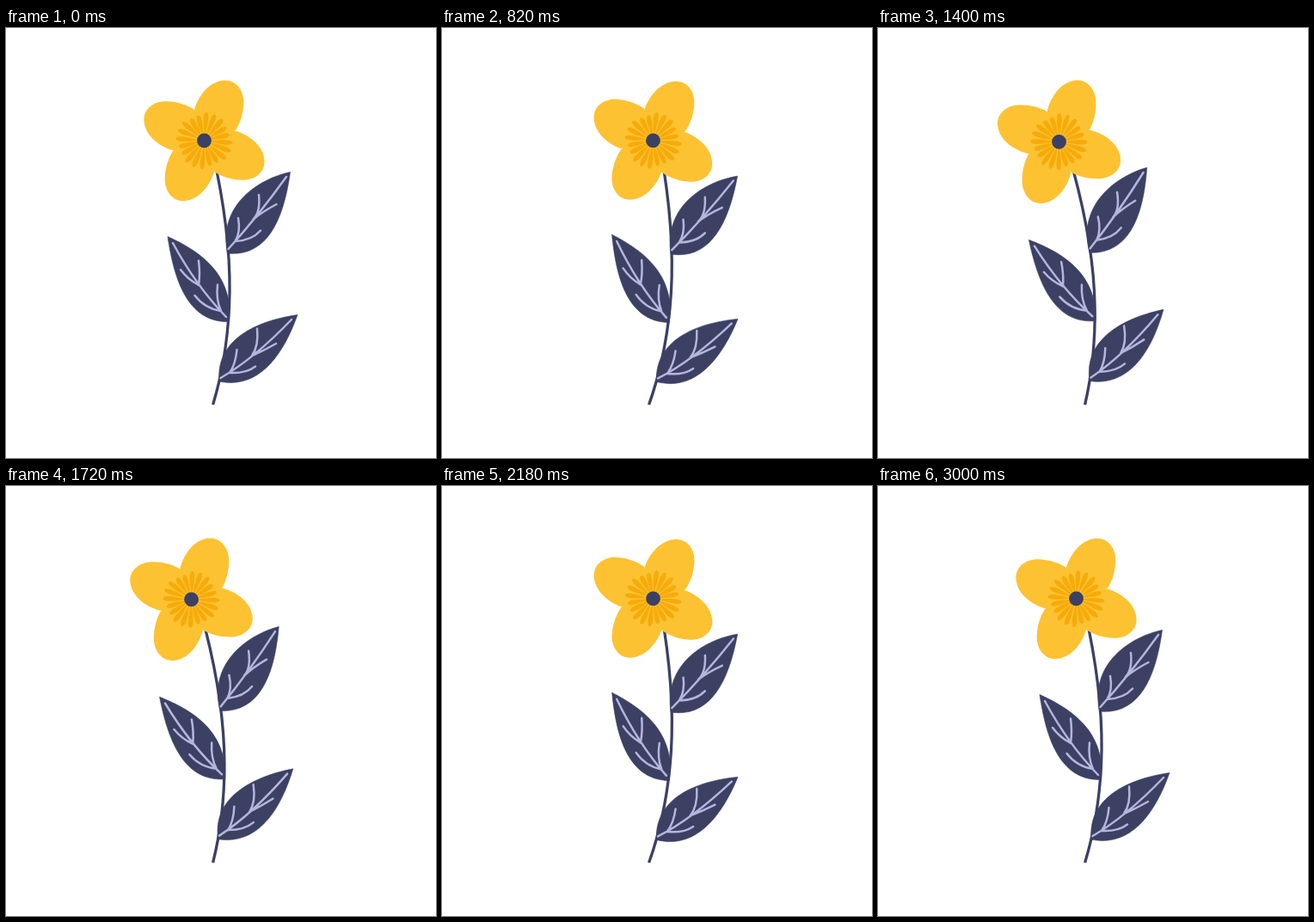
Recreate the animation shown at these times as an HTML page. Size 500 px wide and 500 px high, loop 3020 ms.

```html
<!DOCTYPE html>
<html lang="en">
<head>
<meta charset="utf-8">
<title>Swaying flower</title>
<style>
  html, body { margin: 0; width: 100%; height: 100%; overflow: hidden; background: #fff; }
  svg { display: block; width: 100%; height: 100%; }
</style>
</head>
<body>
<svg viewBox="0 0 500 500">
  <defs>
    <path id="petal" d="M0,0 L-11.5,-36 C-7,-52 6,-69 23,-70 C38,-71 46.3,-57 45.8,-44 C45.5,-31 41.5,-20 36.5,-12 Z"/>
    <path id="stamen" d="M0,-6 C-2,-14 -5,-33 0,-33 C5,-33 2,-14 0,-6"/>
  </defs>
  <g id="plant">
    <path fill="none" stroke="#3c4063" stroke-width="3.3"
      d="M245,166 C257,225 262,275 259.5,325 C257.5,365 250,407 240.6,438"/>
    <g fill="#3c4063" stroke="#3c4063" stroke-width="0.6">
      <path d="M330.5,167.5 C295,175 246,205 257.5,262 C300,266 322,230 330.5,167.5"/>
      <path d="M188,242.5 C222,258 265,284 259.5,341.5 C210,343 195,290 188,242.5"/>
      <path d="M339,333.5 C300,339 243,358 248,411 C292,420 321,384 339,333.5"/>
    </g>
    <g fill="none" stroke="#b4b6de" stroke-width="2.5" stroke-linecap="round">
      <path d="M326,173 Q293,219 258.5,257 M294,194 Q296,214 287.5,222.5 M314.5,205 Q299,213 287.5,222.5 M270,221 Q273,237 266.5,248 M296,235.5 Q286,247 266.5,248"/>
      <path d="M194,250 Q221,300 256,336 M224,270.5 Q226,286 224,299 M203,281 Q211,292 224,299 M246,298.5 Q244,316 250,329 M219.5,311 Q231,326 250,329"/>
      <path d="M332,339 Q289,384 249.5,407 M292,349.5 Q294,370 286,381 M314,367 Q300,375 286,381 M268.5,374 Q267,391 260,401 M290,393.5 Q279,402 260,401"/>
    </g>
    <g id="flower" transform="translate(230.5 131)"></g>
  </g>
</svg>
<script>
const LOOP = 3020, HALF = 1500, PEAK = 600, SWING = 4;
const plant = document.getElementById('plant');

// Four petals with five stamens each
let petals = '', stamens = '';
for (let q = 0; q < 4; q++) {
  petals += `<use href="#petal" transform="rotate(${q * 90})"/>`;
  for (let i = -2; i <= 2; i++) {
    const size = Math.abs(i) === 2 ? 0.91 : 1;
    stamens += `<use href="#stamen" transform="rotate(${q * 90 + 22.5 + i * 18}) scale(1 ${size})"/>`;
  }
}
document.getElementById('flower').innerHTML =
  `<g fill="#fcc232">${petals}<circle r="37"/></g><g fill="#f6ab0a">${stamens}</g><circle r="8.4" fill="#3c4063"/>`;

const ease = x => x * x * (3 - 2 * x);

// The second half of the sway mirrors the first
function angle(t) {
  const m = Math.max(0, HALF - Math.abs(t - HALF));
  const lean = m < PEAK ? ease(m / PEAK) : 1 - 2 * ease((m - PEAK) / (HALF - PEAK));
  return SWING * lean;
}

const start = performance.now();
function draw(now) {
  const t = Math.max(0, now - start) % LOOP;
  plant.setAttribute('transform', `rotate(${angle(t)} 241 438)`);
  requestAnimationFrame(draw);
}
draw(start);
</script>
</body>
</html>
```
